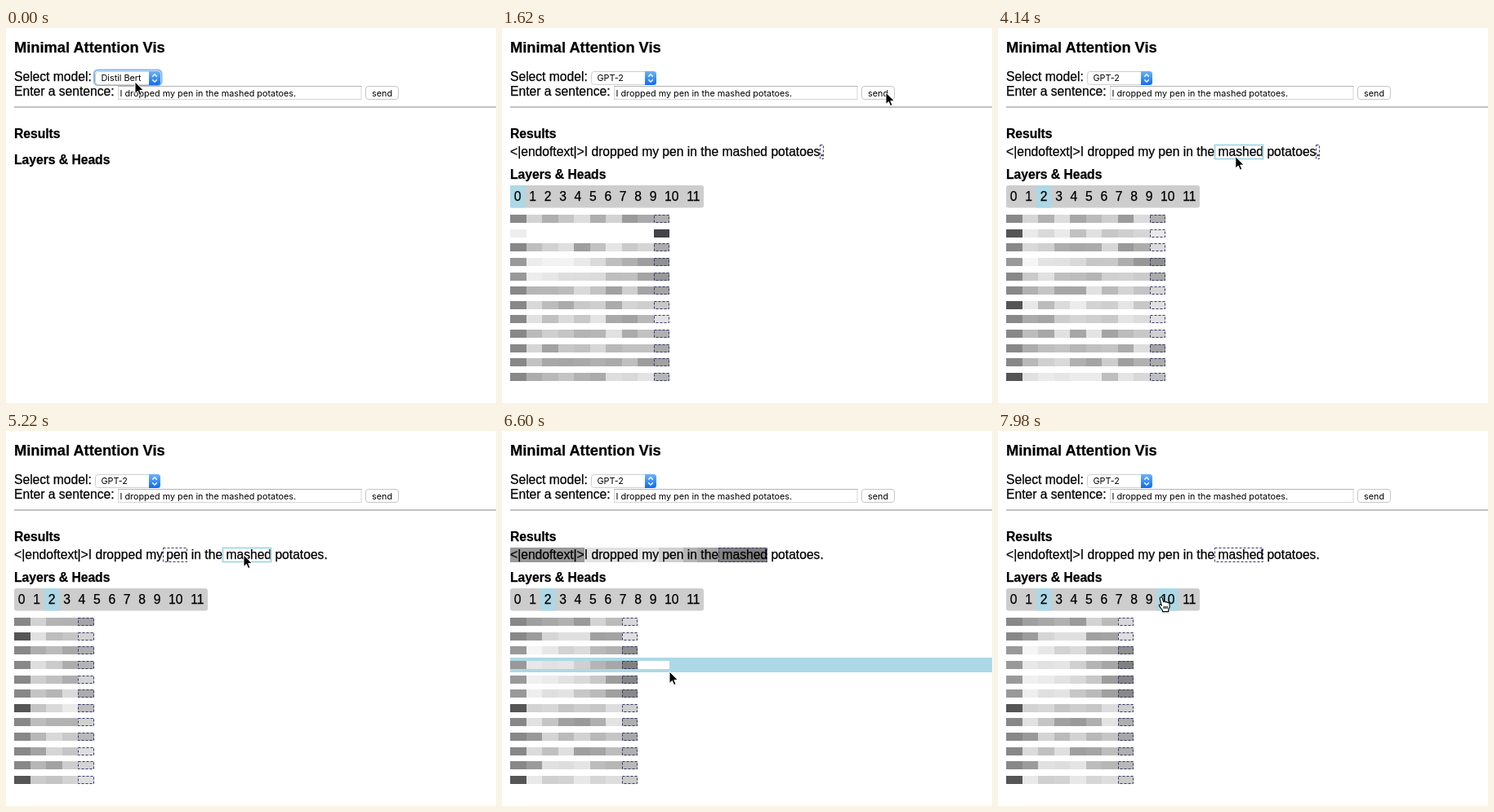
Animation of 600 by 460 pixels, one loop 8 s. Source, as an HTML page:

```html
<!DOCTYPE html>
<html lang="en">
<head>
<meta charset="utf-8">
<title>Minimal Attention Vis</title>
<style>
html, body { margin: 0; width: 100%; height: 100%; overflow: hidden; background: #fff; }
svg { display: block; width: 600px; height: 460px; }
text { font: 15.65px "Liberation Sans", sans-serif; white-space: pre; stroke: #000; stroke-width: .25px; }
.h3 { font-size: 18.27px; font-weight: bold; }
.h4 { font-weight: bold; }
.ui { font: 10.82px Inter, sans-serif; stroke: none; }
.dash { fill: none; stroke: #38386e; stroke-dasharray: 3 2; }
</style>
</head>
<body>
<svg viewBox="0 0 600 460">
  <defs>
    <linearGradient id="blue" x2="0" y2="1">
      <stop stop-color="#6cb3fa"/><stop offset="1" stop-color="#0f6bf5"/>
    </linearGradient>
    <filter id="shadow" x="-20%" y="-30%" width="140%" height="180%">
      <feDropShadow dx="0" dy="4" stdDeviation="4" flood-opacity=".3"/>
    </filter>
    <path id="arrow" d="M0 0V14.5L3.4 11.4L5.6 16.6L8 15.6L5.8 10.5H10.3Z" fill="#000" stroke="#fff"/>
    <path id="hand" d="M-1.3 .2C-.4-.6 .8-.1 1.2 1L2.6 5.6C3.4 4.7 4.8 5 5.2 6C6.2 5.3 7.4 5.8 7.7 6.8C8.9 6.3 9.9 7 10 8.3L10.2 12L8.7 15V17.6H1.5V16L-2.6 10.6C-3.3 9.5-2 8.3-.9 9.1L.3 10.2L-1.8 2C-2 1.2-1.8 .6-1.3 .2ZM3.2 10.8V14M5.2 10.8V14M7.2 10.8V14" fill="#fff" stroke="#000" stroke-width="1.1" stroke-linejoin="round"/>
  </defs>
  <text class="h3" x="10" y="30">Minimal Attention Vis</text>
  <text x="10" y="65.3">Select model:</text>
  <text x="10" y="83.3">Enter a sentence:</text>
  <rect x="137.5" y="71.5" width="297.5" height="16" fill="#fff" stroke="#d6d6d6"/>
  <path d="M137 71.5H435.5" stroke="#b4b4b4"/>
  <text class="ui" x="139.5" y="84">I dropped my pen in the mashed potatoes.</text>
  <rect x="440.5" y="71.5" width="40" height="16" rx="3.5" fill="#fff" stroke="#c6c6c6"/>
  <text class="ui" x="448" y="84">send</text>
  <rect x="10" y="96" width="590" height="2" fill="#c2c2c2"/>
  <text class="h4" x="10" y="135">Results</text>
  <g id="bands"></g>
  <text id="sentence" x="10" y="157"></text>
  <g id="live"></g>
</svg>
<script>
const LOOP = 8000, STEP = 60;
const HEADS = 12, CELL = 19.5, ROW = 17.6, ROWS_TOP = 225.2;
const SEND_AT = 1560, POPUP_AT = 300, PICK_AT = 960;
const LIGHT_BLUE = '#add8e6';
const TOKENS = ['<|endoftext|>', 'I', ' dropped', ' my', ' pen', ' in', ' the', ' mashed', ' potatoes', '.'];

// Cursor stops: arrival, departure, x, y
const STOPS = [
  [0, 120, 158, 66], [780, 960, 150, 42], [1500, 1800, 470, 79], [2520, 3180, 41, 205],
  [3360, 3600, 60, 206], [4080, 4080, 300, 158], [4380, 4620, 212, 154], [5160, 5400, 291, 152],
  [6000, 6000, 208, 232], [6600, 6600, 205, 295], [6900, 6900, 204, 396], [7140, 7140, 200, 243],
  [7500, LOOP, 200, 204]
];

// Each view starts at a click; heads not named in it have mixed attention
const VIEWS = [
  { from: SEND_AT, layer: 0, token: 9, self: [1], ramp: [3, 4], sink: [] },
  { from: 2760, layer: 1, token: 9, self: [], ramp: [10], sink: [6] },
  { from: 3420, layer: 2, token: 9, self: [], ramp: [3], sink: [1, 6, 11] },
  { from: 4500, layer: 2, token: 4, self: [], ramp: [], sink: [1, 6, 11] },
  { from: 5340, layer: 2, token: 7, self: [], ramp: [2, 3, 4, 5], sink: [6, 11] }
];

const hash = n => { const s = Math.sin(n * 12.9898) * 43758.5453; return s - Math.floor(s); };

// Attention strength of a token, 0 is white
function strength(view, head, i) {
  const noise = hash(view.from + head * 31 + i);
  if (view.self.includes(head)) return i === view.token ? 11 : i ? 0 : 1;
  if (view.sink.includes(head)) return i ? 1 + 3 * noise : 10;
  if (view.ramp.includes(head)) return i ? 6 * (i / view.token) ** 2 + 1.5 * noise : 6;
  return i ? 1.5 + 4.5 * noise : 7;
}
for (const view of VIEWS)
  view.heads = Array.from({ length: HEADS }, (_, head) =>
    Array.from({ length: view.token + 1 }, (_, i) => strength(view, head, i)));

const byId = id => document.getElementById(id);
const sentence = byId('sentence'), bands = byId('bands'), live = byId('live');
sentence.textContent = TOKENS.join('');
let count = 0;
const edges = [10, ...TOKENS.map(s => Math.round(10 + sentence.getSubStringLength(0, count += s.length)))];
const layerLeft = i => 10 + i * 18.42 + (i > 10 ? 8.68 : 0);
const cellLeft = i => Math.round(10 + i * CELL);
const rowTop = r => Math.round(ROWS_TOP + r * ROW);

const rect = (x, y, w, h, fill, more = '') =>
  `<rect x="${x}" y="${y}" width="${w}" height="${h}" fill="${fill}" ${more}/>`;
const label = (x, y, s, more = '') => `<text x="${x}" y="${y}" ${more}>${s}</text>`;
const gray = v => { const g = Math.round(255 - 17 * v); return `rgb(${g},${g},${g})`; };

function cursorAt(t) {
  const i = STOPS.findLastIndex(s => s[0] <= t);
  const [, leave, x0, y0] = STOPS[i], [arrive, , x1, y1] = STOPS[i + 1] || STOPS[i];
  if (t <= leave) return [x0, y0];
  const k = (t - leave) / (arrive - leave), eased = k * k * (3 - 2 * k);
  return [x0 + (x1 - x0) * eased, y0 + (y1 - y0) * eased];
}

function drawPopup(onFirst) {
  const [first, second] = onFirst ? ['#fff', '#000'] : ['#000', '#fff'];
  return rect(95, 30, 101, 44, '#f3f3f3', 'rx="5" filter="url(#shadow)"')
    + rect(95, onFirst ? 34 : 52, 101, 18, '#2f7bf6')
    + label(116.5, 47, 'GPT-2', `class="ui" fill="${first}"`)
    + label(116.5, 65.3, 'Distil Bert', `class="ui" fill="${second}"`)
    + `<path d="M102 61.5L104.5 64.5L109 57" fill="none" stroke="${second}" stroke-width="1.4"/>`;
}

function drawSelect(t, y) {
  const ring = t < SEND_AT ? rect(108, 51.5, 82.5, 18.5, '#fff', 'rx="4.5" stroke="#82b4f0" stroke-width="2"') : '';
  return ring + rect(109.5, 53.5, 79, 16, '#fff', 'rx="3.5" stroke="#cfcfcf"')
    + '<path d="M175 53H185.5Q189 53 189 56.5V66.5Q189 70 185.5 70H175Z" fill="url(#blue)"/>'
    + '<path d="M179.2 59.8L182 56.8L184.8 59.8M179.2 63.2L182 66.2L184.8 63.2" fill="none" stroke="#fff" stroke-width="1.3"/>'
    + label(116.5, 65.3, t < PICK_AT ? 'Distil Bert' : 'GPT-2', 'class="ui"')
    + (t >= POPUP_AT && t < PICK_AT ? drawPopup(y < 52) : '');
}

function drawLayers(active, x, hovering) {
  let out = label(10, 185, 'Layers &amp; Heads', 'class="h4"') + rect(10, 193, 237, 27.5, '#cdcdcd', 'rx="3"');
  for (let i = 0; i < 12; i++) {
    const left = layerLeft(i), right = i < 11 ? layerLeft(i + 1) : 247;
    if (i === active || (hovering && x >= left && x < right)) out += rect(left, 193, right - left, 27.5, LIGHT_BLUE, 'rx="1"');
    out += label(left + 4.87, 212, i);
  }
  return out;
}

function drawHeads({ heads, token }, hovered) {
  return heads.map((head, r) => {
    const y = rowTop(r);
    let out = r === hovered ? rect(10, y, 590, rowTop(r + 1) - y, LIGHT_BLUE) : '';
    for (let i = 0; i < TOKENS.length; i++)
      out += rect(cellLeft(i), y + 4, cellLeft(i + 1) - cellLeft(i), 10, gray(head[i] || 0));
    return out + rect(cellLeft(token) + .5, y + 4.5, cellLeft(token + 1) - cellLeft(token) - 1, 9, 'none', 'class="dash"');
  }).join('');
}

function drawTokenBoxes(token, x, hovering) {
  const box = (i, more) => rect(edges[i] + .5, 143.5, edges[i + 1] - edges[i] - 1, 17, 'none', more);
  const i = hovering ? edges.findIndex((e, n) => x >= e && x < edges[n + 1]) : -1;
  return box(token, 'class="dash"') + (i < 0 ? '' : box(i, `stroke="${LIGHT_BLUE}" stroke-width="2"`));
}

function render(t) {
  const [x, y] = cursorAt(t), view = VIEWS.findLast(v => t >= v.from);
  const inBar = y >= 193 && y < 220, inSentence = y >= 143 && y < 162;
  const hovered = Math.floor((y - ROWS_TOP) / ROW);
  const weights = view && view.heads[hovered] || [];
  sentence.setAttribute('visibility', view ? 'visible' : 'hidden');
  bands.innerHTML = weights.map((v, i) => rect(edges[i], 143, edges[i + 1] - edges[i], 18, gray(v))).join('');
  const results = view
    ? drawLayers(view.layer, x, inBar) + drawHeads(view, hovered) + drawTokenBoxes(view.token, x, inSentence)
    : label(10, 167, 'Layers &amp; Heads', 'class="h4"');
  const shape = view && inBar && x < 247 ? 'hand' : 'arrow';
  live.innerHTML = results + drawSelect(t, y) + `<use href="#${shape}" x="${x}" y="${y}"/>`;
}

let last = -1;
const start = performance.now();
function tick() {
  const t = Math.floor(((performance.now() - start) % LOOP) / STEP) * STEP;
  if (t !== last) render(last = t);
  requestAnimationFrame(tick);
}
tick();
</script>
</body>
</html>
```
